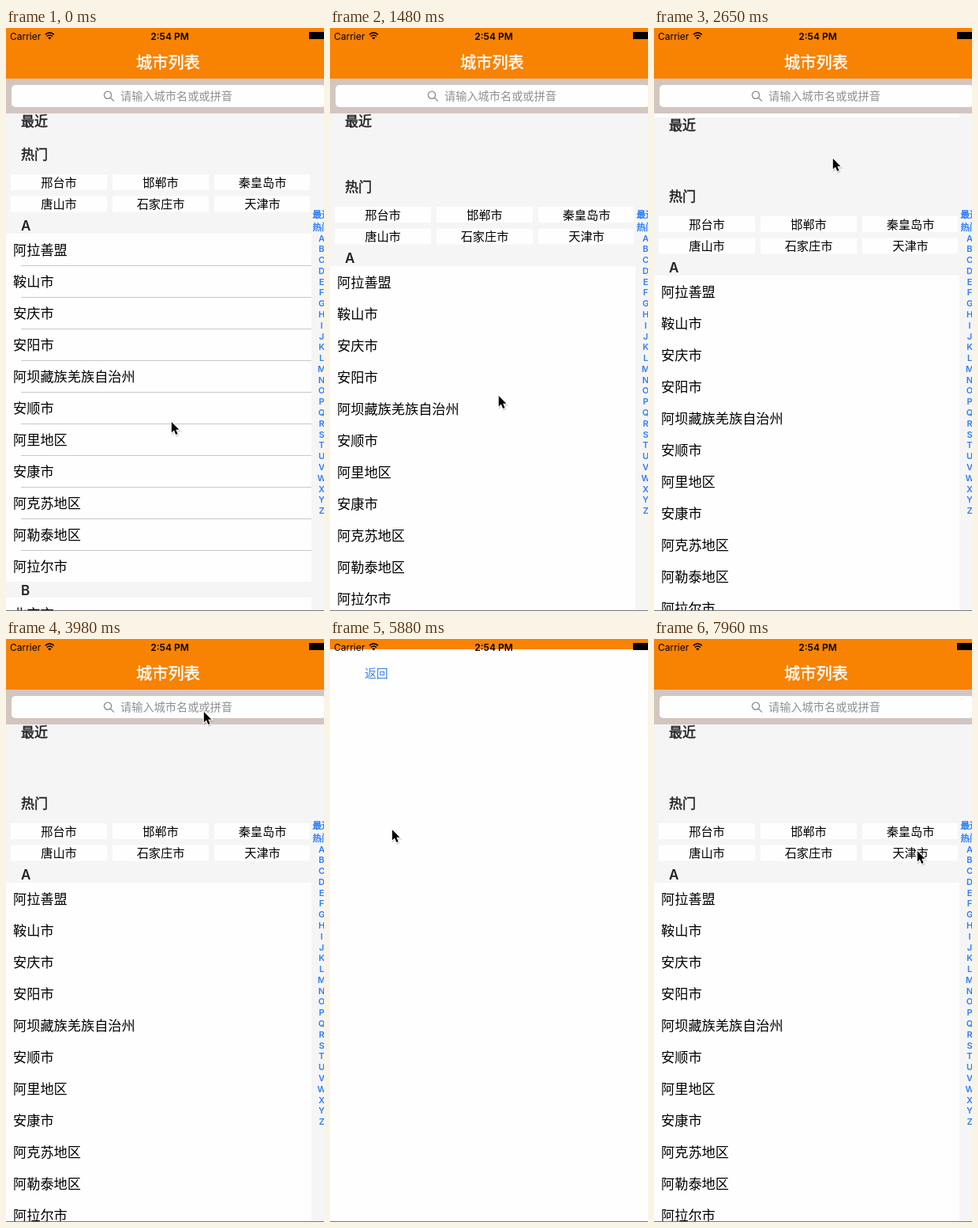
Write an HTML page that moves like this. It is 403 px wide and 737 px high and loops after 8 s.

```html
<!DOCTYPE html>
<html lang="zh-CN">
<head>
<meta charset="utf-8">
<title>城市列表</title>
<style>
  html, body { margin: 0; width: 100%; height: 100%; overflow: hidden; background: #fefefe; }
  svg { display: block; position: absolute; left: 0; top: 0; }
  text { font-family: Inter, "Noto Sans CJK SC", "Noto Sans CJK", sans-serif; fill: #000; }
</style>
</head>
<body>
<svg id="stage" width="403" height="737" viewBox="0 0 403 737" xmlns="http://www.w3.org/2000/svg"></svg>
<script>
const NS = 'http://www.w3.org/2000/svg';
const LOOP = 8000, STEP = 147.2, LEAD = 8;
const WHITE = '#fefefe', GREY = '#f5f5f5', ORANGE = '#f88202', BLUE = '#2f7ff6';

function add(parent, tag, attrs = {}, content = '') {
  const el = document.createElementNS(NS, tag);
  for (const key in attrs) el.setAttribute(key, attrs[key]);
  el.textContent = content;
  return parent.appendChild(el);
}
const group = parent => add(parent, 'g');
const rect = (parent, x, y, width, height, fill, rx = 0) =>
  add(parent, 'rect', { x, y, width, height, fill, rx });

// Places text by the vertical centre of its glyphs.
function label(parent, str, x, mid, size, style = {}) {
  return add(parent, 'text', { x, y: mid + size * 0.37, 'font-size': size, ...style }, str);
}
// A thin stroke gives the medium weight that the CJK font lacks.
const medium = color => ({ style: `fill:${color}`, stroke: color, 'stroke-width': 0.5 });
const heading = (parent, str, mid) => label(parent, str, 19, mid, 17, medium('#222'));
const letterHeading = (parent, str, mid) =>
  label(parent, str, 19, mid, 17, { 'font-weight': 600, style: 'fill:#222' });

const stage = document.getElementById('stage');
rect(stage, 0, 0, 403, 737, WHITE);

// Scrolling list
const list = group(stage);
rect(list, 0, 108, 387, 200, GREY);
heading(list, '热门', 208);
['邢台市', '邯郸市', '秦皇岛市', '唐山市', '石家庄市', '天津市'].forEach((city, i) => {
  const x = 6 + (i % 3) * 129, y = 233 + Math.floor(i / 3) * 27.5;
  rect(list, x, y, i % 3 === 2 ? 121 : 122, 20, WHITE);
  label(list, city, x + 61, y + 10, 15.2, { 'text-anchor': 'middle' });
});
letterHeading(list, 'A', 298);
const rules = group(list);
const cities = ['阿拉善盟', '鞍山市', '安庆市', '安阳市', '阿坝藏族羌族自治州', '安顺市',
  '阿里地区', '安康市', '阿克苏地区', '阿勒泰地区', '阿拉尔市'];
cities.forEach((city, i) => {
  label(list, city, 9, 328.5 + i * 40, 17.2);
  if (i < cities.length - 1) rect(rules, 19, 348 + i * 40, 368, 1, '#c8c8ca');
});
rect(list, 0, 748, 387, 20, GREY);
letterHeading(list, 'B', 758.5);
label(list, '北京市', 9, 788.5, 17.2);

const recent = group(stage);
rect(recent, 0, 108, 387, 19, GREY);
heading(recent, '最近', 118);

// Side index
rect(stage, 387, 108, 16, 629, GREY);
const blueBold = { 'font-weight': 600, style: `fill:${BLUE}` };
label(stage, '最近', 388.5, 236, 11.5, medium(BLUE));
label(stage, '热门', 388.5, 252, 11.5, medium(BLUE));
for (let i = 0; i < 26; i++) {
  label(stage, String.fromCharCode(65 + i), 400, 265.5 + i * 13.78, 11,
    { ...blueBold, 'text-anchor': 'middle' });
}

// Navigation and search bars
rect(stage, 0, 0, 403, 64, ORANGE);
label(stage, '城市列表', 165, 44, 20.2, medium('#fff'));
rect(stage, 0, 64, 403, 44, '#d2c6c0');
rect(stage, 7, 72, 398, 28, WHITE, 5);
add(stage, 'path', {
  d: 'M133.6 84.8a4.6 4.6 0 1 1-9.2 0a4.6 4.6 0 1 1 9.2 0M132.4 88.2L137 92.6',
  fill: 'none', stroke: '#8c8c90', 'stroke-width': 1.3
});
label(stage, '请输入城市名或或拼音', 145, 86, 14.2, { style: 'fill:#909094' });

// Search sheet
const sheet = group(stage);
rect(sheet, 0, 0, 403, 737, WHITE);
const back = label(sheet, '返回', 44, 31, 14.8);

// Status bar
label(stage, 'Carrier', 5, 10.5, 12);
label(stage, '2:54 PM', 207.5, 10.5, 12, { 'font-weight': 600, 'text-anchor': 'middle' });
add(stage, 'path', {
  d: 'M49.8 8.3Q55.3 3.3 60.8 8.3M51.8 10.6Q55.3 7.4 58.8 10.6',
  fill: 'none', stroke: '#000', 'stroke-width': 1.6
});
add(stage, 'path', { d: 'M55.3 14.6L53.2 12.4Q55.3 10.8 57.4 12.4Z' });
rect(stage, 384, 5, 19, 9, '#000');
rect(stage, 0, 736, 403, 1, '#777');

const pointer = group(stage);
const arrow = 'M.8 1V14.4L3.9 11.6L6.2 17L8.6 16L6.2 10.8H10.4Z';
add(pointer, 'path', { d: arrow, fill: '#000', opacity: 0.15, transform: 'translate(.8 1.6)',
  stroke: '#000', 'stroke-width': 2 });
add(pointer, 'path', { d: arrow, fill: '#000', stroke: '#fff', 'stroke-width': 2,
  'paint-order': 'stroke' });

// Tables of [step, values...]
const scrollKeys = [[0, 48], [5, 40], [14, -19], [17, -7], [21, 0]];
const pointerKeys = [
  [0, 209, 497], [5, 218, 506], [8, 216, 520], [14, 207, 352], [20, 236, 70],
  [24, 246, 84], [27, 250, 91], [32, 75, 252], [34, 84, 246], [35, 81, 244],
  [40, 78, 240], [44, 57, 31], [47, 56, 30], [52, 326, 270], [54, 333, 267]
];

function sample(keys, step) {
  const next = keys.findIndex(key => key[0] > step);
  if (next < 0) return keys[keys.length - 1].slice(1);
  const a = keys[next - 1], b = keys[next];
  const p = (step - a[0]) / (b[0] - a[0]);
  return a.slice(1).map((v, i) => v + (b[i + 1] - v) * p);
}

// Critically damped spring: the part of the way still to go
function remaining(ms) {
  const x = Math.max(0, ms) * 0.013;
  return (1 + x) * Math.exp(-x);
}

const OPEN = 5420, CLOSE = 6670;
function sheetTop(t) {
  const part = t < CLOSE ? remaining(t - OPEN) : 1 - remaining(t - CLOSE);
  return Math.round(737 * part);
}

const move = (el, x, y) => el.setAttribute('transform', `translate(${x} ${y})`);

function draw(time) {
  const step = Math.floor((time + LEAD) / STEP);
  const t = Math.max(0, step * STEP - LEAD);
  const scroll = Math.round(sample(scrollKeys, step)[0]);
  move(list, 0, -scroll);
  move(recent, 0, Math.max(0, -scroll));
  rules.style.display = scroll > 19 ? '' : 'none';
  move(sheet, 0, sheetTop(t));
  back.style.fill = t < CLOSE ? '#3a80f6' : '#4f9ff7';
  move(pointer, ...sample(pointerKeys, step).map(Math.round));
}

const start = performance.now();
function tick() {
  draw((performance.now() - start) % LOOP);
  requestAnimationFrame(tick);
}
tick();
</script>
</body>
</html>
```
